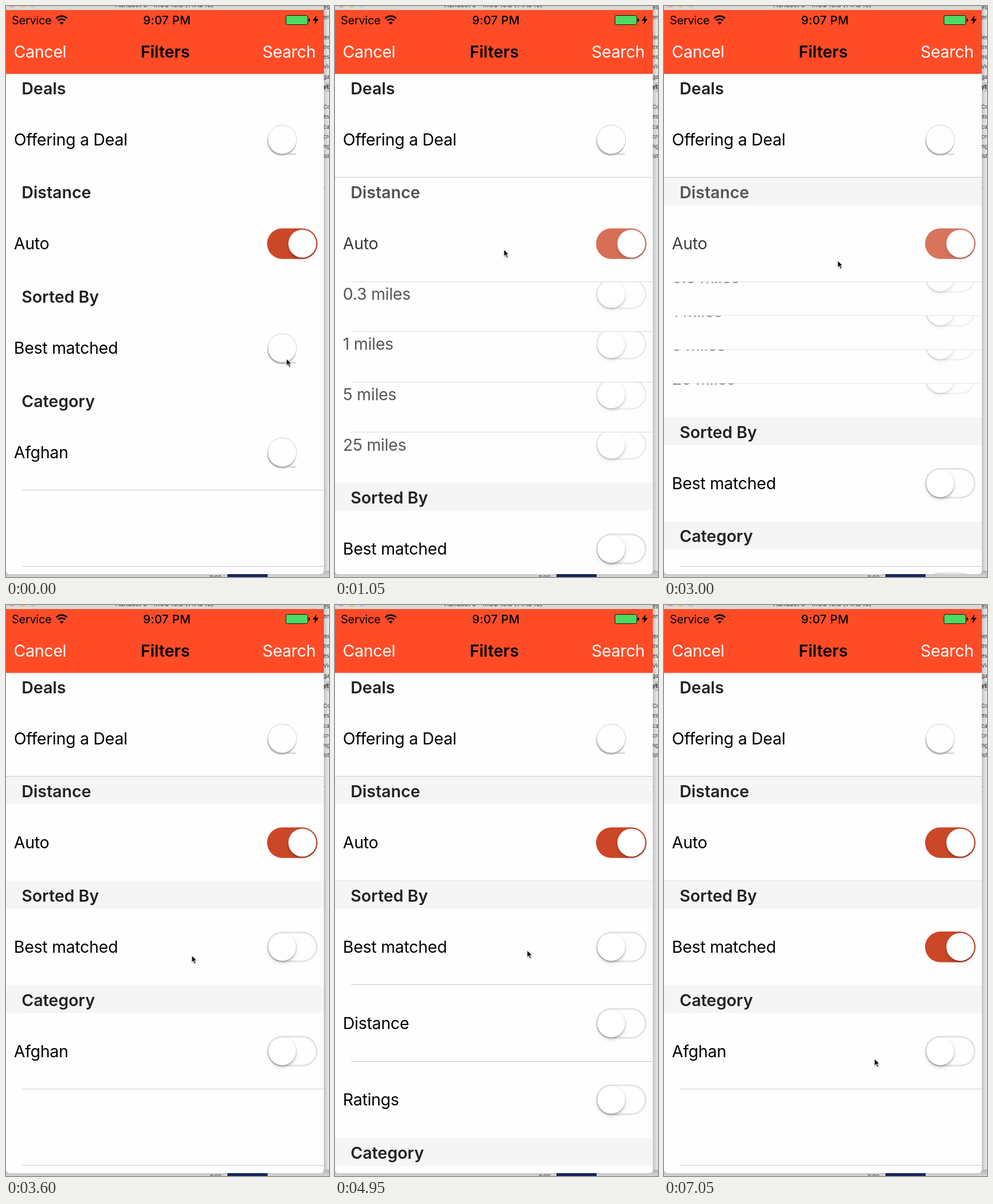
Animation, 563 px wide and 995 px high, one loop 8000 ms. Source, as an HTML page:

```html
<!DOCTYPE html>
<html lang="en">
<head>
<meta charset="utf-8">
<title>Filters</title>
<style>
  html, body { margin: 0; width: 100%; height: 100%; overflow: hidden; background: #ececec; }
  svg { display: block; }
  text { font: 400 28.5px Inter, "Liberation Sans", sans-serif; letter-spacing: -.3px; }
  .head { font-weight: 600; letter-spacing: 0; }
  .status { font-size: 20px; letter-spacing: -.3px; }
  .clock { font-size: 20.5px; font-weight: 500; letter-spacing: .3px; }
  .tiny { font-size: 9.5px; letter-spacing: 0; fill: #333; }
  .knob { filter: drop-shadow(0 2px 1px rgba(0,0,0,.22)) drop-shadow(0 4px 3px rgba(0,0,0,.12)); }
</style>
</head>
<body>
<svg id="stage" width="563" height="995" viewBox="0 0 563 995">
  <defs>
    <clipPath id="win"><path d="M0 7H554V984a6 6 0 0 1-6 6H6a6 6 0 0 1-6-6z"/></clipPath>
    <linearGradient id="side"><stop stop-color="#bdbdbd"/><stop offset="1" stop-color="#ededed"/></linearGradient>
    <linearGradient id="under" x2="0" y2="1"><stop stop-color="#b4b4b4"/><stop offset="1" stop-color="#d6d6d6"/></linearGradient>
  </defs>

  <rect x="553" width="10" height="995" fill="url(#side)"/>
  <rect x="554" y="133" width="9" height="17" fill="#c6c6c6"/>
  <g id="behind"></g>
  <rect y="984" width="563" height="11" fill="url(#under)"/>
  <rect x="386" y="989" width="70" height="6" fill="#17265c"/>
  <text class="tiny" x="355" y="999">8:00</text>

  <rect width="554" height="8" fill="#d9d9d9"/>
  <circle cx="11" cy="-3.5" r="6" fill="#e6a09a"/>
  <circle cx="29" cy="-3.5" r="6" fill="#ecc163"/>
  <circle cx="47" cy="-3.5" r="6" fill="#c2c2c2"/>
  <text class="tiny" x="276" y="2" text-anchor="middle" style="font-size:11.5px">Handset 6 - mOS 10.3 (14A345)</text>

  <g clip-path="url(#win)">
    <rect y="7" width="554" height="984" fill="#fefefe"/>
    <g id="list"></g>
    <rect y="7" width="554" height="111" fill="#ff4c27"/>
    <rect y="118" width="554" height="1" fill="#d8c4be"/>
    <text class="status" x="10" y="32">Service</text>
    <g fill="none" stroke="#000" stroke-width="2.9">
      <path d="M87.5 21.5a13.5 13.5 0 0 1 19 0M91 25.3a8.6 8.6 0 0 1 12 0"/>
      <path d="M97 32.5l-3.4-3.6a4.8 4.8 0 0 1 6.8 0z" fill="#000" stroke="none"/>
    </g>
    <text class="clock" x="280.5" y="32" text-anchor="middle">9:07 PM</text>
    <rect x="488" y="16.5" width="38" height="16" rx="2.5" fill="#4cd964" stroke="#111"/>
    <path d="M527.5 21.5q2.5 0 2.5 3t-2.5 3z"/>
    <path d="M541.5 16l-7 9.5h4.5l-1.5 7 7.5-10h-4.6z"/>
    <text x="13.5" y="90" fill="#fff">Cancel</text>
    <text class="head" x="277.5" y="90" text-anchor="middle">Filters</text>
    <text x="539.8" y="90" text-anchor="end" fill="#fff">Search</text>
  </g>
  <path id="cursor" d="M0 0v11.4l2.6-2.4 2.1 4.8 2-.9-2.1-4.6h3.6z" stroke="#fff" stroke-width=".8"
        style="filter:drop-shadow(0 1px 1px rgba(0,0,0,.35))"/>
</svg>
<script>
const LOOP = 8000, STEP = 150;
const HEAD = 48.5, ROW = 133.2, SECTION = HEAD + ROW, TOP = 299;
const $ = id => document.getElementById(id);
const clamp = v => Math.min(1, Math.max(0, v));
const mix = (a, b, k) => a + (b - a) * k;

// cubic-bezier(.42, 0, .58, 1), solved by bisection
function ease(x) {
  x = clamp(x);
  let lo = 0, hi = 1;
  for (let i = 0; i < 20; i++) {
    const u = (lo + hi) / 2, v = 1 - u;
    if (1.26 * v * v * u + 1.74 * v * u * u + u ** 3 < x) lo = u; else hi = u;
  }
  return lo * lo * (3 - 2 * lo);
}

// time, x, y of the pointer tip
const POINTER = [
  [0, 489, 615], [750, 294.5, 424.5], [2250, 294.5, 424.5], [2400, 300, 442], [2550, 303, 444],
  [3000, 303, 444], [3600, 324, 611], [3900, 324, 611], [4050, 400, 606], [4200, 475, 606],
  [4350, 335, 602], [5550, 335, 602], [6000, 477, 606], [6450, 477, 606], [6600, 433, 654],
  [6750, 381, 741], [6900, 381, 741], [7050, 367, 791], [LOOP, 367, 791]
];

function pointerAt(t) {
  const i = POINTER.findIndex(k => k[0] > t);
  const [t0, x0, y0] = POINTER[i - 1], [t1, x1, y1] = POINTER[i];
  const k = (t - t0) / (t1 - t0);
  return [mix(x0, x1, k), mix(y0, y1, k)];
}

// hairline on the last whole pixel above an edge
const line = (x, edge, alpha = 1) =>
  `<rect x="${x}" y="${Math.floor(edge - .5)}" width="${554 - x}" height="1" fill="#c8c7cc" opacity="${alpha}"/>`;

function toggle(y, k) {
  const tint = clamp(k * 1.37);
  const color = [[227, 203], [227, 71], [227, 39]].map(([a, b]) => Math.round(mix(a, b, tint)));
  const w = 82 * (1 - k), h = Math.min(47.5, w);
  return `<rect x="455" y="${y - 26.7}" width="88" height="53.4" rx="26.7" fill="rgb(${color})"/>
    <rect x="${540 - w}" y="${y - h / 2}" width="${w}" height="${h}" rx="${h / 2}" fill="#fefefe"/>
    <circle class="knob" cx="${481.5 + 35 * k}" cy="${y}" r="24.4" fill="#fff" stroke="#000" stroke-opacity=".07"/>`;
}

// trackless look of a switch that is off
const bareToggle = y =>
  `<rect x="478" y="${y + 24.6}" width="27.5" height="2.4" fill="#d4d4d4"/>
   <circle cx="480.8" cy="${y + 2.6}" r="25.6" fill="#b4b4b4"/>
   <circle cx="481.5" cy="${y}" r="25" fill="#fefefe" stroke="#d2d2d2"/>`;

// content hangs from the bottom edge and is clipped at the top
function row(y, label, draw, { h = ROW, alpha = 1 } = {}) {
  if (h < .5) return "";
  const mid = h - ROW / 2;
  return `<svg y="${y}" width="554" height="${h}"><rect width="554" height="${h}" fill="#fefefe"/>
    <g opacity="${alpha}"><text x="13.8" y="${mid + 10.2}">${label}</text>${draw(mid)}</g></svg>`;
}

const header = (y, label, shaded, alpha = 1, rule = false) =>
  `<rect y="${y}" width="554" height="${HEAD}" fill="${shaded ? "#f5f5f5" : "#fefefe"}"/>
   <text class="head" x="27.2" y="${y + 36.2}" fill="#222" opacity="${alpha}">${label}</text>
   ${rule ? line(0, y) : ""}`;

// a section whose extra rows open by the amount p
function section(y, title, first, extras, p, draw, shaded, rule) {
  const alpha = 1 - p * (1 - p), h = ROW * p;
  const extra = (label, i) => {
    const top = y + SECTION + i * h;
    return row(top, label, m => toggle(m, 0), { h, alpha: p }) + line(28, top, p);
  };
  return row(y + HEAD, first, draw, { alpha }) + extras.map(extra).join("") +
    header(y, title, shaded, alpha, rule);
}

function render(t) {
  const open = (a, b) => ease((t - a) / 300) - ease((t - b) / 300);
  const distance = open(872, 2840), sorted = open(4620, 6110);
  const fresh = t >= 900;
  const off = fresh ? m => toggle(m, 0) : bareToggle;
  const matched = t < 6080 ? off : m => toggle(m, clamp((t - 6080) / 265));
  const sortClosing = t >= 6110 && t < 6450;
  const closing = sortClosing || (t >= 2840 && t < 3150);
  const miles = ["0.3 miles", "1 miles", "5 miles", "25 miles"];
  const y1 = TOP - SECTION;
  const y2 = TOP + SECTION + miles.length * ROW * distance;
  const y3 = y2 + SECTION + 2 * ROW * sorted;
  const end = y3 + SECTION;

  $("list").innerHTML =
    header(y1, "Deals", false) +
    row(y1 + HEAD, "Offering a Deal", bareToggle) +
    row(y3 + HEAD, "Afghan", off) +
    line(28, end) + line(28, end + ROW) +
    (closing ? line(28, TOP + 3 * SECTION + ROW) : "") +
    header(y3, "Category", fresh, 1, sortClosing) +
    section(y2, "Sorted By", "Best matched", ["Distance", "Ratings"], sorted, matched, fresh, t >= 4650) +
    section(TOP, "Distance", "Auto", miles, distance, m => toggle(m, 1), t >= 1200, fresh);

  $("cursor").setAttribute("transform", `translate(${pointerAt(t)})`);
}

const SCRAPS = [[6, "ess"], [23, "en"], [58, "ier"], [75, "tre"], [92, "ess"], [109, "Vie"], [127, "gat"],
  [144, "yb"], [179, "Co"], [196, "ess"], [214, "ca"], [231, "cre"], [248, "ng"], [265, "ist"], [317, "."]];
$("behind").innerHTML = SCRAPS.map(([y, s]) =>
  `<text class="tiny" x="553" y="${y}"${s === "yb" ? ' style="font-weight:700"' : ""}>${s}</text>`).join("");

let shown = -1;
function frame() {
  const t = Math.floor(performance.now() % LOOP / STEP) * STEP;
  if (t !== shown) render(shown = t);
  requestAnimationFrame(frame);
}
frame();
</script>
</body>
</html>
```
